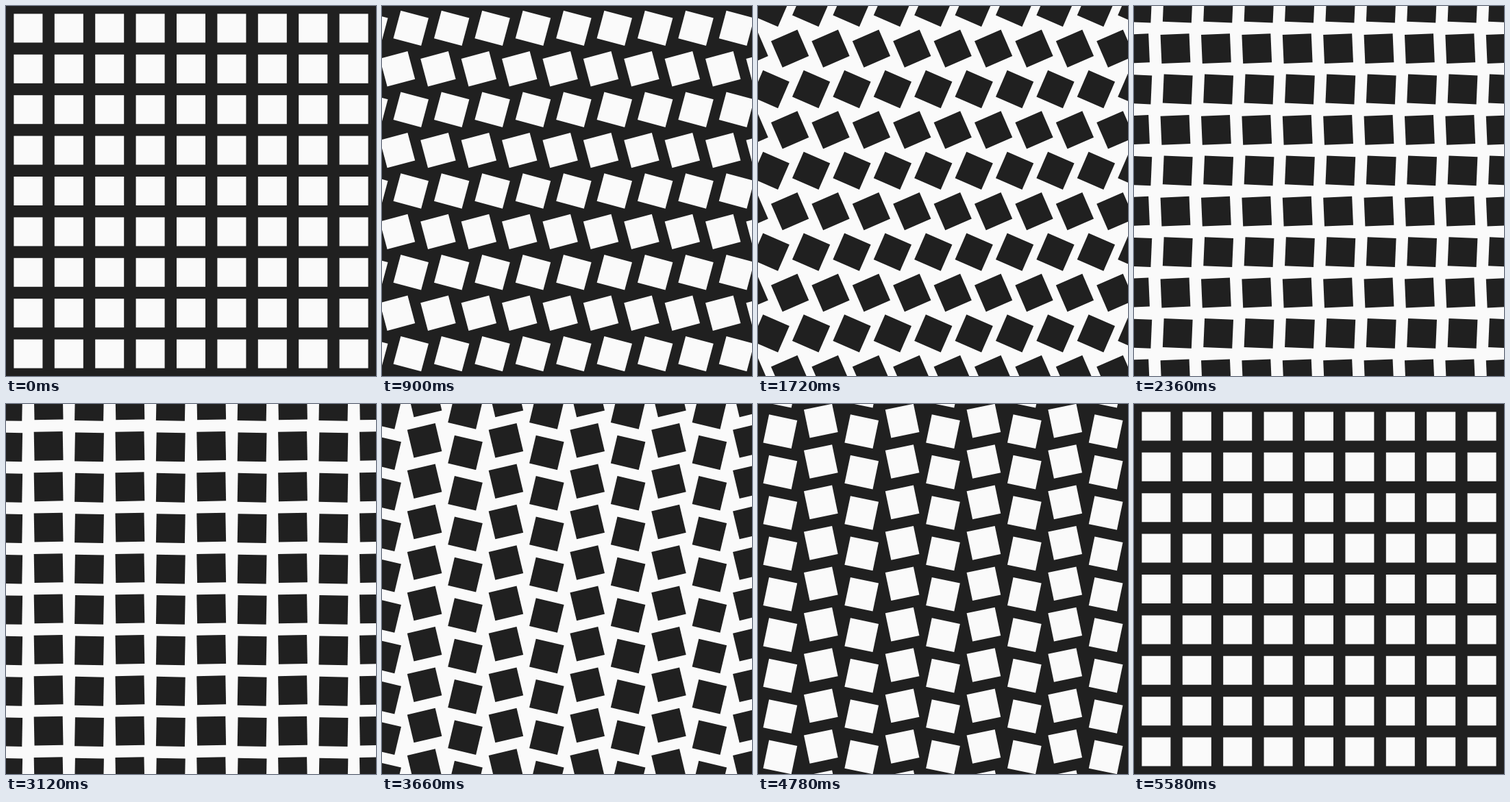
An HTML page with a canvas for the animation above (5.6 s loop, 540 by 540 pixels).

```html
<!DOCTYPE html>
<html lang="en">
<head>
<meta charset="utf-8">
<title>Rolling squares</title>
<style>
  html, body { margin: 0; width: 100%; height: 100%; overflow: hidden; background: #202020; }
  canvas { display: block; width: 540px; height: 540px; }
</style>
</head>
<body>
<canvas id="stage" width="540" height="540"></canvas>
<script>
const ctx = document.getElementById("stage").getContext("2d");
const SIZE = 540, STAGE = 1400, LOOP = 4 * STAGE;
const STEP = 59.4, SIDE = STEP / Math.SQRT2, REACH = 6;
const DARK = "#202020", LIGHT = "#fafafa";

function square(x, y, angle) {
  ctx.save();
  ctx.translate(x, y);
  ctx.rotate(angle);
  ctx.fillRect(-SIDE / 2, -SIDE / 2, SIDE, SIDE);
  ctx.restore();
}

// amount: 0 = upright grid, 1 = diamonds touching at their corners
function lattice(dark, vertical, amount) {
  ctx.fillStyle = dark ? LIGHT : DARK;
  ctx.fillRect(0, 0, SIZE, SIZE);
  ctx.fillStyle = dark ? DARK : LIGHT;
  const offset = SIZE / 2 + (dark ? STEP / 2 : 0);
  for (let line = -REACH; line <= REACH; line++) {
    const turn = (line % 2 === 0) === dark ? -amount : amount;
    const across = offset + line * STEP;
    for (let i = -REACH; i <= REACH; i++) {
      const along = offset + (i + turn / 2) * STEP;
      const angle = turn * Math.PI / 4;
      if (vertical) square(across, along, angle);
      else square(along, across, angle);
    }
  }
}

function draw(now) {
  const t = now % LOOP;
  const stage = Math.floor(t / STAGE);
  const p = t / STAGE - stage;
  const amount = Math.pow(stage % 2 ? 1 - p : p, 2.5);
  lattice(stage === 1 || stage === 2, stage >= 2, amount);
}

function tick() {
  draw(performance.now());
  requestAnimationFrame(tick);
}

draw(0);
requestAnimationFrame(tick);
</script>
</body>
</html>
```
